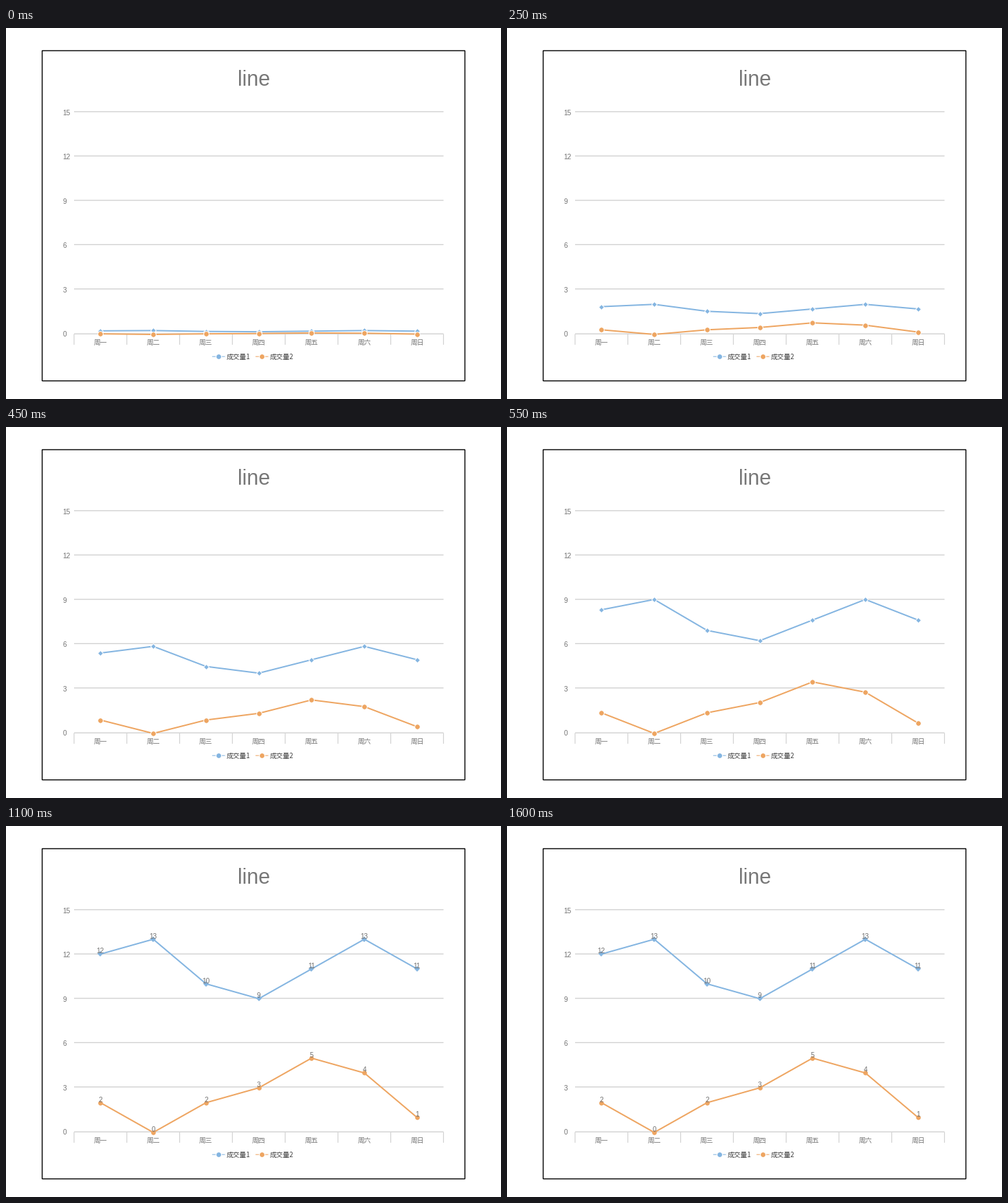
A matplotlib script for the animation above (1.65 s loop, 720 by 540 pixels).

```python
import numpy as np
import matplotlib.pyplot as plt
from matplotlib.animation import FuncAnimation
from matplotlib.patches import Rectangle

W, H = 720, 540
FRAMES, STEP = 33, 50
BLUE, ORANGE = "#84b5e1", "#eea561"
GRID, GRAY = "#d2d2d2", "#727272"
LEFT, RIGHT, COL = 99, 636.4, 76.77
ZERO, UNIT = 446.0, 21.63
SANS, CJK = "Liberation Sans", "Noto Sans CJK JP"
LABELS_AT = 700

fig = plt.figure(figsize=(W / 72, H / 72), dpi=72, facecolor="white")
ax = fig.add_axes([0, 0, 1, 1])
ax.set_xlim(0, W)
ax.set_ylim(H, 0)
ax.axis("off")


def text(x, y, s, size, color=GRAY, ha="center", font=SANS):
    return ax.text(x, y, s, fontsize=size, color=color, ha=ha,
                   va="baseline", family=font, zorder=8)


def segment(x, y, color, width, z=1):
    ax.plot(x, y, color=color, lw=width, solid_capstyle="butt",
            snap=False, zorder=z)


def legend_item(x, color, name):
    segment([x - 9.3, x + 9.3], [478.2, 478.2], color, 1, 2)
    ax.plot([x], [478.2], "o", ms=8, color=color, mec="white", mew=1.2, zorder=3)
    text(x + 11.5, 481.8, name, 9.7, "#444444", "left", CJK)


class Series:
    def __init__(self, values, color, marker, size, z):
        self.values = np.array(values)
        self.size = size
        self.x = LEFT + COL * (np.arange(len(values)) + 0.5)
        self.line, = ax.plot(self.x, self.x, color=color, lw=2, zorder=z)
        self.dots, = ax.plot(self.x, self.x, marker, color=color, mec="white",
                             snap=False, zorder=z + 1)
        self.labels = [text(x, ZERO - UNIT * v - 1, str(v), 10)
                       for x, v in zip(self.x, values)]

    def update(self, grow, done):
        y = ZERO - UNIT * self.values * grow
        ring = 0 if done else 1
        self.line.set_ydata(y)
        self.dots.set_ydata(y)
        self.dots.set_markeredgewidth(ring)
        self.dots.set_markersize(self.size + ring)
        for label in self.labels:
            label.set_visible(done)


ax.add_patch(Rectangle((52.6, 33), 614.9, 480.6, fill=False,
                       ec="black", lw=1.4, snap=False))
text(360.4, 83.9, "line", 30.5, "#777777")

for v in range(0, 16, 3):
    y = 444.3 - 21.5 * v
    if v:
        segment([LEFT, RIGHT], [y, y], GRID, 1.4)
    text(82.6, y + 4.9, str(v), 10, ha="left")
segment([LEFT, RIGHT], [445.2, 445.2], GRID, 1.4)
for k in range(8):
    x = LEFT + COL * k
    segment([x, x], [445.5, 461], GRID, 1.2)
for k, day in enumerate("一二三四五六日"):
    text(LEFT + COL * (k + 0.5), 461.3, "周" + day, 9.8, font=CJK)

legend_item(309.2, BLUE, "成交量1")
legend_item(372.2, ORANGE, "成交量2")

series = [
    Series([12, 13, 10, 9, 11, 13, 11], BLUE, "D", 5.2, 3),
    Series([2, 0, 2, 3, 5, 4, 1], ORANGE, "o", 6.7, 5),
]


def draw(i):
    ms = i * STEP
    # accelerating growth, already under way when the loop starts
    grow = min(1, 0.327 + 0.001043 * ms) ** 3.5
    for s in series:
        s.update(grow, ms >= LABELS_AT)
    return []


anim = FuncAnimation(fig, draw, frames=FRAMES, interval=STEP,
                     repeat=True, repeat_delay=0, blit=False)
plt.show()
```
